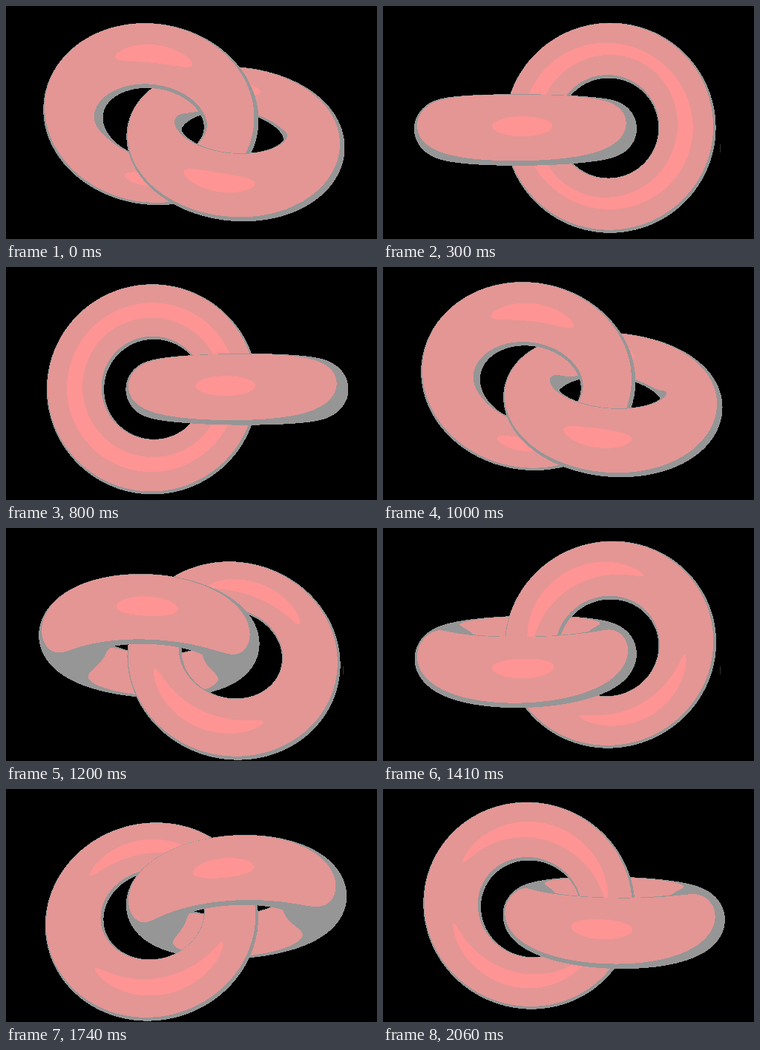
Animation, 500 px wide and 315 px high, one loop 2170 ms. Source, as an HTML page with a canvas:

```html
<!DOCTYPE html>
<html lang="en">
<head>
<meta charset="utf-8">
<title>Linked rings</title>
<style>
  html, body { margin: 0; width: 100%; height: 100%; overflow: hidden; background: #000; }
  canvas { display: block; }
</style>
</head>
<body>
<canvas width="500" height="315"></canvas>
<script>
const W = 500, H = 315, LOOP = 2170;
const ctx = document.querySelector('canvas').getContext('2d');

// Scene: x right, y down, z towards the viewer
const MID_X = 251.2, MID_Y = 164.8, EYE = 416;
const BIG = 104, TUBE = 36, OFFSET = 53;
const LIGHT = [-43, -60, 425];
const SHADE = 0.33, SHINE = 0.9595;
const GREY = [150, 150, 150], PINK = [228, 150, 148], GLOSS = [255, 148, 148];

const starts = [0, 60, 170, 280, 390, 500, 590, 695, 800, 880, 980, 1080,
  1200, 1290, 1410, 1530, 1650, 1740, 1860, 1960, 2060];
// [step, degrees turned about the horizontal axis]
const turns = [[0, 37.5], [5, 126.5], [8, 180], [12, 245.8], [14, 282.3], [17, 335.8], [20, 372.3]];

function angleAt(step) {
  const k = Math.max(1, turns.findIndex(([s]) => s >= step));
  const [s0, a0] = turns[k - 1], [s1, a1] = turns[k];
  return a0 + (a1 - a0) * (step - s0) / (s1 - s0);
}

// Ring space: x and u span the ring's plane, n is its axis
function makeRing(cx, degrees) {
  const a = degrees * Math.PI / 180, sin = Math.sin(a), cos = Math.cos(a);
  const turn = (x, y, z) => [x, y * sin + z * cos, y * cos - z * sin];
  return { sin, cos, eye: turn(-cx, 0, EYE), light: turn(LIGHT[0] - cx, LIGHT[1], LIGHT[2]) };
}

// Distance along the ray to the ring, or Infinity
function trace({ eye: [ox, ou, on] }, dx, du, dn) {
  const b = ox * dx + ou * du + on * dn;
  const disc = b * b - ox * ox - ou * ou - on * on + (BIG + TUBE) ** 2;
  if (disc < 0) return Infinity;
  const half = Math.sqrt(disc), end = half - b;
  let t = -b - half;
  while (t < end) {
    const x = ox + dx * t, u = ou + du * t, n = on + dn * t;
    const q = Math.sqrt(x * x + u * u) - BIG;
    const gap = Math.sqrt(q * q + n * n) - TUBE;
    if (gap < 0.02) return t;
    t += gap;
  }
  return Infinity;
}

function shade({ eye, light }, dir, t) {
  const p = eye.map((o, i) => o + dir[i] * t);
  const k = 1 - BIG / Math.hypot(p[0], p[1]);
  const normal = [p[0] * k / TUBE, p[1] * k / TUBE, p[2] / TUBE];
  const dot = v => (v[0] * normal[0] + v[1] * normal[1] + v[2] * normal[2])
    / Math.sqrt(v[0] * v[0] + v[1] * v[1] + v[2] * v[2]);
  const l = [light[0] - p[0], light[1] - p[1], light[2] - p[2]];
  if (dot(l) < SHADE) return GREY;
  const len = Math.sqrt(l[0] * l[0] + l[1] * l[1] + l[2] * l[2]);
  const between = [l[0] / len - dir[0], l[1] / len - dir[1], l[2] / len - dir[2]];
  return dot(between) > SHINE ? GLOSS : PINK;
}

function render(step) {
  const img = ctx.createImageData(W, H), a = angleAt(step);
  const rings = [makeRing(-OFFSET, a + 90), makeRing(OFFSET, a)];
  for (let j = 0; j < H; j++) {
    for (let i = 0; i < W; i++) {
      const x = i - MID_X, y = j - MID_Y;
      const len = Math.sqrt(x * x + y * y + EYE * EYE);
      const dx = x / len, dy = y / len, dz = -EYE / len;
      let near = Infinity, ring, du, dn;
      for (const r of rings) {
        const u = dy * r.sin + dz * r.cos, n = dy * r.cos - dz * r.sin;
        const t = trace(r, dx, u, n);
        if (t < near) { near = t; ring = r; du = u; dn = n; }
      }
      if (!ring) continue;
      const [red, green, blue] = shade(ring, [dx, du, dn], near);
      const o = (j * W + i) * 4;
      img.data[o] = red;
      img.data[o + 1] = green;
      img.data[o + 2] = blue;
      img.data[o + 3] = 255;
    }
  }
  return img;
}

const cache = [];
let shown = -1;

function draw(step) {
  ctx.putImageData(cache[step] ||= render(step), 0, 0);
  // Faint blinking caret behind the rings
  const t = starts[step];
  if (t >= 90 && (t - 90) % 1060 < 530) {
    ctx.globalCompositeOperation = 'destination-over';
    ctx.fillStyle = '#333';
    ctx.fillRect(454, 187, 1, 11);
  }
}

const begin = performance.now();
function tick() {
  const t = (performance.now() - begin) % LOOP;
  const step = starts.findLastIndex(s => s <= t);
  if (step !== shown) draw(shown = step);
  requestAnimationFrame(tick);
}
tick();
</script>
</body>
</html>
```
